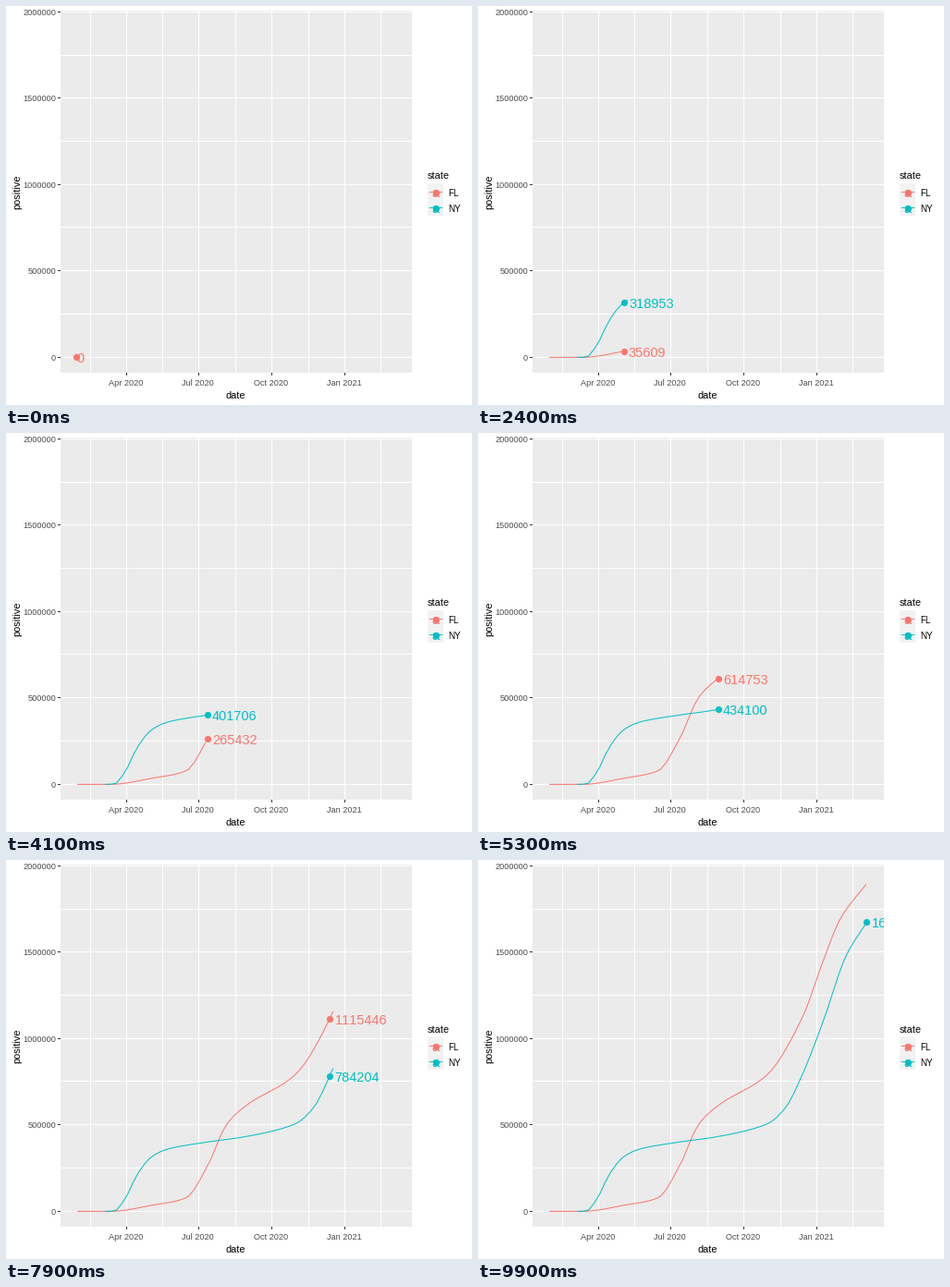
A matplotlib script that plays this animation: 504x432 px, repeating every 10 s.

```python
import math

import matplotlib.pyplot as plt
import numpy as np
from matplotlib.animation import FuncAnimation
from matplotlib.patches import Rectangle

W, H = 504, 432
LEFT, TOP, RIGHT, BOTTOM = 59, 5, 439, 397
FRAMES, LAST_DAY = 100, 403

plt.rcParams["font.family"] = "Liberation Sans"
plt.rcParams["text.kerning_factor"] = 6

# Turning points of each curve: (days since 29 January 2020, cases)
FL = [(0, 0), (44, 51), (96, 35609), (138, 76300), (166, 265432),
      (190, 505000), (215, 614753), (276, 789714), (320, 1115446),
      (348, 1463000), (369, 1698000), (402, 1899400)]
NY = [(35, 6), (48, 1700), (63, 83712), (77, 213779), (96, 318953),
      (117, 362764), (166, 401706), (215, 434100), (276, 505431),
      (299, 597200), (320, 784204), (348, 1112900), (376, 1481700),
      (402, 1674380)]


def smooth(points):
    """Monotone cubic curve through the given points."""
    xs, ys = np.array(points, float).T
    h = np.diff(xs)
    d = np.diff(ys) / h
    m = np.r_[d[0], 2 * d[:-1] * d[1:] / (d[:-1] + d[1:]), d[-1]]

    def curve(x):
        k = np.clip(np.searchsorted(xs, x, side="right") - 1, 0, len(h) - 1)
        t = (x - xs[k]) / h[k]
        return (ys[k] * (1 + 2 * t) * (1 - t) ** 2
                + ys[k + 1] * t * t * (3 - 2 * t)
                + h[k] * t * (1 - t) * (m[k] * (1 - t) - m[k + 1] * t))

    return curve


def px(day):
    return 76.3 + 0.857 * day


def py(cases):
    return 380.4 - 1.8688e-4 * cases


fig = plt.figure(figsize=(W / 72, H / 72), dpi=72, facecolor="white")
ax = fig.add_axes([0, 0, 1, 1])
ax.set_xlim(0, W)
ax.set_ylim(H, 0)
ax.axis("off")


def box(x, y, w, h, color):
    patch = Rectangle((x, y), w, h, fc=color, lw=0, antialiased=False)
    return ax.add_patch(patch)


def text(x, y, s, size, color="black", ha="left", **kw):
    return ax.text(x, y, s, size=size, color=color, ha=ha, va="baseline", **kw)


def rule(x0, y0, x1, y1, color):
    """Crisp one-pixel horizontal or vertical line."""
    box(x0, y0, max(x1 - x0, 1), max(y1 - y0, 1), color)


def dot(x, y, color):
    return ax.plot([x], [y], "o", ms=7.2, mew=0, color=color, zorder=4)[0]


# Panel, grid and axes
panel = box(LEFT, TOP, RIGHT - LEFT, BOTTOM - TOP, "#EBEBEB")
for day in (17.5, 108.5, 200, 292, 383):
    rule(round(px(day)), TOP, round(px(day)), BOTTOM, "white")
for n in range(9):
    y = math.floor(py(n * 250000) - 0.3)
    rule(LEFT, y, RIGHT, y, "white")
    if n % 2 == 0:
        rule(LEFT - 3, y, LEFT, y, "#333333")
        text(54, y + 4, str(n * 250000), 9.1, "#4D4D4D", "right")
for day, s in ((63, "Apr 2020"), (154, "Jul 2020"),
               (246, "Oct 2020"), (338, "Jan 2021")):
    x = round(px(day))
    rule(x, TOP, x, BOTTOM, "white")
    rule(x, BOTTOM, x, BOTTOM + 3, "#333333")
    text(x - 0.5, 411, s, 9.1, "#4D4D4D", "center")
text(248.5, 425, "date", 11, ha="center")
ax.text(12, 201.5, "positive", size=11, rotation=90, ha="center", va="center")


class State:
    def __init__(self, name, points, color, first, last, key_y):
        self.curve = smooth(points)
        self.first, self.last = first, last
        self.weeks = np.array([d for d in range(2, 402, 7) if d >= first])
        self.line, = ax.plot([], [], color=color, lw=1, zorder=3)
        self.dot = dot(0, 0, color)
        self.label = text(0, 0, "", 14.5, color, zorder=5, clip_on=True)
        self.label.set_clip_path(panel)
        # Legend key
        box(456, key_y - 9, 17, 18, "#F2F2F2")
        rule(458, key_y, 472, key_y, color)
        dot(464.5, key_y + 0.5, color)
        text(464.5, key_y + 6, "a", 14.5, color, "center", zorder=5)
        text(478.5, key_y + 5, name, 9.9)

    def update(self, now, day):
        shown = self.weeks[self.weeks - 3 <= now]
        self.line.set_data(px(shown) - 0.4, py(self.curve(shown)))
        alive = self.first <= day <= self.last
        self.dot.set_visible(alive)
        self.label.set_visible(alive)
        if not alive:
            return
        cases = round(float(self.curve(day)))
        x, y = px(day) - 0.4, py(cases)
        self.dot.set_data([x], [y])
        s = str(cases)
        self.label.set_text(s)
        self.label.set_position((x + 0.8 * len(s), y + 6))


text(456, 187, "state", 11)
states = [State("FL", FL, "#F8766D", 0, 401, 201),
          State("NY", NY, "#00BFC4", 35, 402, 218)]


def update(i):
    now = LAST_DAY * i / (FRAMES - 1)
    day = max(0, math.floor(now - 0.7))
    for state in states:
        state.update(now, day)
    return []


anim = FuncAnimation(fig, update, frames=FRAMES, interval=100, repeat=True,
                     repeat_delay=0, blit=False)
plt.show()
```
